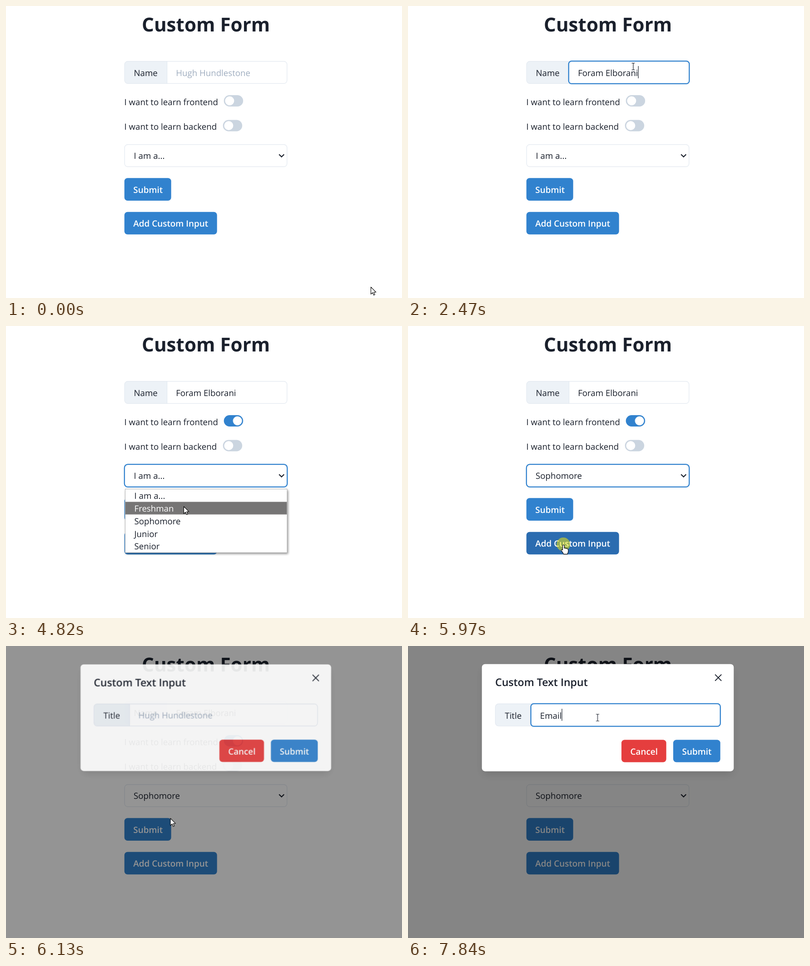
Write an HTML page that moves like this. It is 872 px wide and 642 px high and loops after 8 s.

```html
<!DOCTYPE html>
<html lang="en">
<head>
<meta charset="utf-8">
<title>Custom Form</title>
<style>
html, body { margin: 0; width: 100%; height: 100%; overflow: hidden; background: #fff; }
svg { display: block; width: 872px; height: 642px; }
text { font: 18.68px "Open Sans", "Noto Sans", sans-serif; fill: #1a202c; white-space: pre; text-rendering: geometricPrecision; }
.title { font-size: 42.2px; font-weight: 700; }
.head { font-size: 23.1px; font-weight: 600; }
.btn text { font-weight: 600; font-size: 18.9px; fill: #fff; }
.box { fill: none; stroke: #e2e8f0; stroke-width: 1.2; }
.addon { fill: #edf2f7; }
.hint { fill: #a0aec0; }
.blue { fill: #3182ce; }
.focus { fill: none; stroke: #3182ce; stroke-width: 2.3; }
.halo { fill: none; stroke: #4299e1; stroke-opacity: .6; stroke-width: 3.7; }
.line { fill: none; stroke: #1a202c; }
.caret { fill: #1a202c; }
.skin { fill: #fff; stroke: #000; stroke-width: 1.1; stroke-linejoin: round; }

/* Every state runs on one 8 s clock; 1% = 80 ms */
.run { animation: 8s step-end infinite; }
#pointer { animation-name: move; }
#arrow { animation-name: arrow; }
#hand { animation-name: hand; }
#beam { animation-name: beam; }
#press { animation-name: press; }
#nameFocus { animation-name: nameFocus; }
#track { animation-name: track; }
#knob { animation-name: knob; }
#trackHalo { animation-name: trackHalo; }
#selectFocus { animation-name: selectFocus; }
#prompt { animation-name: prompt; }
#chosen { animation-name: chosen; }
#list { animation-name: list; }
#bar { animation-name: bar; }
.row1 { animation-name: row1; }
.row2 { animation-name: row2; }
.row3 { animation-name: row3; }
#add { animation-name: add; }
#shade { animation-name: shade; }
#modal { animation-name: modal; transform-origin: 440px 157.5px; }
#closeHalo { animation-name: closeHalo; }
#titleFocus { animation-name: titleFocus; }

@keyframes move {
  0% { transform: translate(803px, 617px); }
  .875% { transform: translate(803px, 617px); animation-timing-function: steps(2, start); }
  2.83% { transform: translate(757px, 544px); animation-timing-function: steps(3, start); }
  5.75% { transform: translate(542px, 206px); animation-timing-function: steps(2, start); }
  7.7% { transform: translate(496px, 133px); }
  38.75% { transform: translate(496px, 133px); animation-timing-function: steps(3, start); }
  41.56% { transform: translate(500px, 202px); }
  45.5% { transform: translate(500px, 202px); animation-timing-function: steps(7, start); }
  52.25% { transform: translate(455px, 327px); }
  55.125% { transform: translate(455px, 327px); animation-timing-function: steps(6, start); }
  61% { transform: translate(391px, 396px); animation-timing-function: steps(2, start); }
  63% { transform: translate(384px, 426px); }
  67.125% { transform: translate(384px, 426px); animation-timing-function: steps(7, start); }
  73.95% { transform: translate(342px, 480px); }
  76.56% { transform: translate(342px, 480px); animation-timing-function: steps(2, start); }
  78.44% { transform: translate(381px, 276px); animation-timing-function: steps(5, start); }
  83.3%, 100% { transform: translate(417.5px, 157.5px); }
}
@keyframes arrow {
  0%, 39.625%, 45.5%, 75.625% { opacity: 1; }
  5.75%, 40.625%, 70.05%, 82.3%, 100% { opacity: 0; }
}
@keyframes hand {
  0%, 45.5%, 75.625%, 100% { opacity: 0; }
  40.625%, 70.05% { opacity: 1; }
}
@keyframes beam {
  0%, 39.625% { opacity: 0; }
  5.75%, 82.3%, 100% { opacity: 1; }
}
@keyframes press {
  0%, 8.625%, 44.5%, 54.125%, 64.125%, 75.625%, 84.375%, 100% { opacity: 0; }
  6.75%, 42.5%, 52.125%, 62.125%, 73.625%, 82.5% { opacity: 1; }
}
@keyframes nameFocus {
  0%, 44.5%, 100% { opacity: 0; }
  6.75%, 42.5% { opacity: .5; }
  7.625% { opacity: 1; }
}
@keyframes track {
  0% { fill: #cbd5e0; }
  44.5% { fill: #7facd7; }
  45.5%, 100% { fill: #3182ce; }
}
@keyframes knob {
  0% { transform: none; }
  44.5% { transform: translateX(7px); }
  45.5% { transform: translateX(14px); }
  46.5%, 100% { transform: translateX(17.3px); }
}
@keyframes trackHalo {
  0%, 54.25%, 100% { opacity: 0; }
  42.5%, 53.25% { opacity: .5; }
  43.5% { opacity: 1; }
}
@keyframes selectFocus {
  0%, 76.625%, 100% { opacity: 0; stroke-width: 1.2; }
  53.25%, 75.625% { opacity: .55; stroke-width: 1.2; }
  54.25% { opacity: 1; stroke-width: 2.3; }
}
@keyframes prompt { 0% { opacity: 1; } 64.125%, 100% { opacity: 0; } }
@keyframes chosen { 0% { opacity: 0; } 64.125%, 100% { opacity: 1; } }
@keyframes list { 0%, 64.125%, 100% { opacity: 0; } 52.125% { opacity: 1; } }
@keyframes bar {
  0% { transform: none; }
  59.9% { transform: translateY(27.8px); }
  61%, 100% { transform: translateY(55.6px); }
}
@keyframes row1 { 0% { fill: #fff; } 59.9%, 100% { fill: #1a202c; } }
@keyframes row2 { 0%, 61%, 100% { fill: #1a202c; } 59.9% { fill: #fff; } }
@keyframes row3 { 0% { fill: #1a202c; } 61%, 100% { fill: #fff; } }
@keyframes add { 0%, 76.625%, 100% { fill: #3182ce; } 70.05% { fill: #2b6cb0; } }
@keyframes shade {
  0% { opacity: 0; }
  75.625% { opacity: .13; }
  76.625% { opacity: .42; }
  77.5%, 100% { opacity: .48; }
}
@keyframes modal {
  0% { opacity: 0; transform: scale(.95); }
  75.625% { opacity: .27; transform: scale(.963); }
  76.625% { opacity: .9; transform: scale(.995); }
  77.5%, 100% { opacity: 1; transform: none; }
}
@keyframes closeHalo { 0%, 83.4%, 100% { opacity: 0; } 77.5% { opacity: 1; } }
@keyframes titleFocus { 0% { opacity: 0; } 82.5% { opacity: .5; } 83.4%, 100% { opacity: 1; } }
</style>
</head>
<body>
<svg viewBox="0 0 872 642">
  <defs>
    <filter id="soft" x="-20%" y="-20%" width="140%" height="150%"><feGaussianBlur stdDeviation="2.5"/></filter>
    <filter id="wide" x="-20%" y="-30%" width="140%" height="170%"><feGaussianBlur stdDeviation="9"/></filter>
  </defs>

  <text class="title" x="299" y="56">Custom Form</text>

  <path class="addon" d="M355 121.5H268.5a7 7 0 0 0-7 7v35a7 7 0 0 0 7 7H355z"/>
  <rect class="box" x="261.2" y="121.6" width="357.6" height="48.8" rx="7"/>
  <path class="box" d="M354.6 121.6v48.8"/>
  <text x="281.5" y="153.5">Name</text>
  <rect id="nameFocus" class="focus run" x="353.8" y="121.1" width="265.6" height="49.8" rx="6.5"/>
  <text id="nameText" x="374.2" y="153.5"></text>
  <rect id="nameCaret" class="caret" y="132" width="1.2" height="27"/>

  <text x="260.5" y="217.5">I want to learn frontend</text>
  <rect id="trackHalo" class="halo run" x="477.9" y="194.2" width="46.1" height="28.6" rx="14.3"/>
  <rect id="track" class="run" x="479.7" y="196" width="42.5" height="25" rx="12.5"/>
  <circle id="knob" class="run" cx="492.4" cy="208.5" r="10" fill="#fff"/>

  <text x="260.5" y="272">I want to learn backend</text>
  <rect x="477.7" y="250.5" width="42.5" height="25" rx="12.5" fill="#cbd5e0"/>
  <circle cx="490.4" cy="263" r="10" fill="#fff"/>

  <rect class="box" x="261.2" y="304.6" width="357.6" height="48.8" rx="7"/>
  <rect id="selectFocus" class="focus run" x="260.8" y="304.2" width="358.5" height="49.7" rx="7.5"/>
  <text id="prompt" class="run" x="281.5" y="335.5">I am a...</text>
  <text id="chosen" class="run" x="281" y="335.5">Sophomore</text>
  <path class="line" d="M601.3 326.2l5.5 5.5 5.5-5.5" stroke-width="2.3"/>

  <g class="btn">
    <rect class="blue" x="260.7" y="378.3" width="103" height="49.7" rx="7"/>
    <text x="280.3" y="411">Submit</text>
    <rect id="add" class="run" x="260.7" y="452.8" width="204" height="49.4" rx="7"/>
    <text x="280.3" y="485.3">Add Custom Input</text>
  </g>

  <g id="list" class="run">
    <rect x="264" y="361" width="357" height="140" fill="#000" opacity=".45" filter="url(#soft)"/>
    <rect x="262.5" y="358.5" width="356.5" height="139.7" fill="#fff" stroke="#b5b5b5"/>
    <rect id="bar" class="run" x="263" y="358.8" width="355.5" height="27.7" fill="#767575"/>
    <text class="run row1" x="282.5" y="380.3">I am a...</text>
    <text class="run row2" x="282.5" y="408">Freshman</text>
    <text class="run row3" x="282.5" y="435.8">Sophomore</text>
    <text x="282.5" y="463.5">Junior</text>
    <text x="282.5" y="491.2">Senior</text>
  </g>

  <rect id="shade" class="run" width="872" height="642"/>

  <g id="modal" class="run">
    <rect x="167" y="52" width="546" height="228" rx="7" opacity=".15" filter="url(#wide)"/>
    <rect x="162.7" y="39.7" width="554.6" height="235.7" rx="7" fill="#fff"/>
    <text class="head" x="192" y="88">Custom Text Input</text>
    <rect id="closeHalo" class="halo run" x="661.7" y="48.3" width="42.2" height="42.2" rx="8"/>
    <path class="line" d="M676.2 62.7l14 14m0-14l-14 14" stroke-width="1.9"/>
    <path class="addon" d="M271.5 127H199.5a7 7 0 0 0-7 7v35a7 7 0 0 0 7 7H271.5z"/>
    <rect class="box" x="192.4" y="127.2" width="494.8" height="48.8" rx="7"/>
    <path class="box" d="M271.2 127.2v48.8"/>
    <text x="213.3" y="159.5">Title</text>
    <rect id="titleFocus" class="focus run" x="270.5" y="126.8" width="417.3" height="49.8" rx="6.5"/>
    <text id="titleText" x="290.8" y="159.5"></text>
    <rect id="titleCaret" class="caret" y="138" width="1.2" height="26.5"/>
    <g class="btn">
      <rect x="470" y="206.2" width="98.7" height="49.3" rx="7" fill="#e53e3e"/>
      <text x="489.5" y="238.7">Cancel</text>
      <rect class="blue" x="584" y="206.2" width="103.7" height="49.3" rx="7"/>
      <text x="603.5" y="238.7">Submit</text>
    </g>
  </g>

  <g id="pointer" class="run">
    <circle id="press" class="run" r="15" fill="#fff000" fill-opacity=".5"/>
    <path id="arrow" class="skin run" d="M.5.8V16.6l3.7-3.4 2.5 5.6 2.5-1.1-2.4-5.5h4.9z"/>
    <path id="hand" class="skin run" d="M-1.5 3a1.8 1.8 0 0 1 3.6 0v5.5q2-1.1 3.2.7 2-.9 3.1.8 2.5-.4 2.5 2.2v3.4q0 2.5-1.5 4v2H.6q-1.3-3.5-4-6.5-2-2.5-.6-3.4 1.3-.7 2.5 1z"/>
    <path id="beam" class="run line" d="M-3.5-7.5h2.5l1 1 1-1h2.5M0-6.5v13M-3.5 7.5h2.5l1-1 1 1h2.5" stroke-width="1.2"/>
  </g>
</svg>

<script>
const LOOP = 8000, BLINK = 470, HINT = "Hugh Hundlestone";
const byId = id => document.getElementById(id);

const fields = [
  { id: "name", value: "Foram Elborani", focus: 540, blur: 3400,
    keys: [1010, 1320, 1380, 1550, 1620, 1700, 1860, 2010, 2090, 2240, 2240, 2400, 2400, 2470] },
  { id: "title", value: "Email", focus: 6660, blur: LOOP,
    keys: [7440, 7520, 7590, 7670, 7840] }
].map(f => ({ ...f, text: byId(f.id + "Text"), caret: byId(f.id + "Caret") }));

function drawField({ value, focus, blur, keys, text, caret }, t) {
  const count = keys.filter(k => k <= t).length;
  const last = count ? keys[count - 1] : focus;
  const shown = count ? value.slice(0, count) : HINT;
  if (text.textContent !== shown) text.textContent = shown;
  text.classList.toggle("hint", !count);
  const lit = t >= focus && t < blur && Math.floor((t - last) / BLINK) % 2 === 0;
  caret.setAttribute("opacity", lit ? 1 : 0);
  caret.setAttribute("x", +text.getAttribute("x") + (count ? text.getComputedTextLength() : 0));
}

let start;
function tick(now) {
  start ??= now;
  const t = (now - start) % LOOP;
  fields.forEach(f => drawField(f, t));
  requestAnimationFrame(tick);
}
requestAnimationFrame(tick);
</script>
</body>
</html>
```
